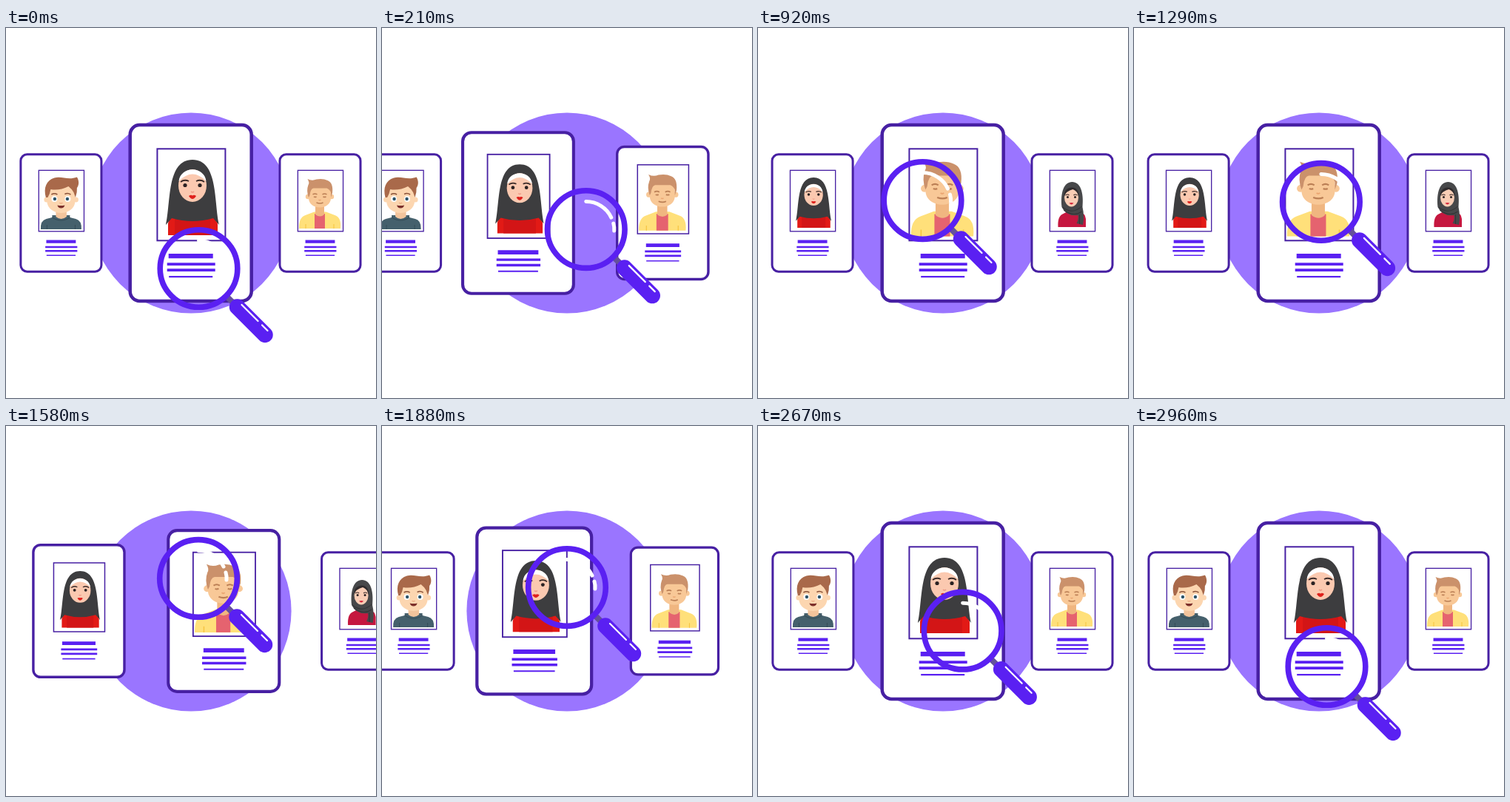
Animation, 500 px wide and 500 px high, one loop 3 s. Source, as an HTML page:

```html
<!DOCTYPE html>
<html>
<head>
<meta charset="utf-8">
<style>
html, body { margin: 0; height: 100%; overflow: hidden; background: #fff; }
svg { display: block; width: 100vw; height: 100vh; }
</style>
</head>
<body>
<svg viewBox="0 0 500 500">
  <defs>
    <g id="sheet">
      <rect x="-82" y="-119" width="164" height="238" rx="13" fill="#fff" stroke="#4720a3" stroke-width="4.500"/>
      <rect x="-45.300" y="-86.700" width="92" height="124" fill="#fff" stroke="#4720a3" stroke-width="2"/>
      <path fill="#5a20f2" d="M-30 55h60v6.300h-60zM-32 67.200h65v3.800h-65zM-32 75.200h65v3.800h-65zM-29.500 85h59v2.200h-59z"/>
    </g>
  </defs>

  <circle cx="250" cy="250" r="135.600" fill="#9a75ff"/>

  <g id="boy"><use href="#sheet"/>
    <g transform="scale(1.504)">
      <path fill="#45606c" d="M-27.500 22Q-28 10 -20 8L-12 6V3H12V6L20 8Q28 10 27.500 22Z"/>
      <path fill="#f3c49c" d="M-7-6H7.500V5Q0 11-7 5Z"/>
      <path fill="none" stroke="#354d58" stroke-width="1" d="M-12 6Q0 14 12 6M-19 16V22M19 16V22"/>
      <g fill="#fcd6b0">
        <circle cx="-19.500" cy="-18" r="3.500"/><circle cx="20" cy="-18" r="3.500"/>
        <path d="M-19-36H19V-16C19-6 9 0 0 0S-19-6-19-16Z"/>
      </g>
      <path fill="#a9694a" d="M-20.500-21C-24-34-20-44-9-47.500C1-50 10-44 21.500-48.500C25-43 24-37 21.500-34Q22-28 19.500-21L17-28Q14-33 10-36Q-2-30-14-32Q-15-26-18-21Z"/>
      <g fill="#fff"><circle cx="-9" cy="-19" r="4"/><circle cx="9" cy="-19" r="4"/></g>
      <g fill="#2d5368"><circle cx="-8.500" cy="-19" r="2.200"/><circle cx="8.500" cy="-19" r="2.200"/></g>
      <path fill="none" stroke="#8a5238" stroke-width="1.500" d="M-13-25Q-9-27.500-5-25M5-25.500Q9-27.500 13-25"/>
      <path fill="none" stroke="#eeb48c" stroke-width="1.500" d="M-2-14Q0-12 2-14"/>
      <path fill="#7c2f2a" d="M-5-10.500Q0-9.500 5-10.500Q4-6.500 0-6.500T-5-10.500Z"/>
    </g>
  </g>

  <g id="red"><use href="#sheet"/>
    <g transform="translate(-249.700 -250)">
      <path fill="#e21a16" d="M219 280V264Q220 255 230 253H274Q285 255 286 265V280Z"/>
      <path fill="#d31516" d="M228 255H276V280H228Z"/>
      <path fill="#3d3d3f" d="M216 266C223 236 217 178 252 178S281 236 288 266L280 257Q252 265 224 257Z"/>
      <ellipse cx="252" cy="213" rx="19" ry="22" fill="#fbc9b0"/>
      <path fill="#fff" d="M233.500 207C236 186 268 186 270.500 207Q252 188 233.500 207Z"/>
      <path fill="none" stroke="#3a2a28" stroke-width="1.800" d="M236 208Q241 204 247 207M257 207Q263 204 268 208"/>
      <g fill="#2b2223"><circle cx="242" cy="212.500" r="2.600"/><circle cx="262" cy="212.500" r="2.600"/></g>
      <path fill="none" stroke="#ee9a86" stroke-width="1.500" d="M250 221Q252 223 254 221"/>
      <path fill="#df211c" d="M247 227Q250 225 252 226.500Q254 225 257 227Q252 235 247 227Z"/>
    </g>
  </g>

  <g id="blond"><use href="#sheet"/>
    <g transform="scale(1.504)">
      <path fill="#ffe07a" d="M-28.500 21Q-29 6 -20 3L-8-1.500H8L20 3Q29 6 27.500 21Z"/>
      <path fill="#e5636f" d="M-7.500 1H6.500V21H-7.500Z"/>
      <path fill="#f5c33f" d="M-20 15h1v6h-1zM18 15h1v6h-1z"/>
      <path fill="#f0b680" d="M-6.500-12H5.500V2Q0 7-6.500 2Z"/>
      <g fill="#f8c897">
        <circle cx="-16.500" cy="-22" r="3.200"/><circle cx="15.500" cy="-22" r="3.200"/>
        <path d="M-15.500-36H14.500V-20C14.500-12 7-7.500-.5-7.500S-15.500-12-15.500-20Z"/>
      </g>
      <path fill="#cb916b" d="M-17-46Q-11-43-5-45.500Q4-47 10-44Q18-41 16.500-27L14.500-21V-28Q13-32 9-33.500H-9Q-13-33-14-24L-15.500-21Q-19-30-16-38Q-14-41-17-46Z"/>
      <path fill="none" stroke="#bb7f55" stroke-width="1.500" d="M-10-25Q-7-27-4-25M3-25Q6-27 9-25M-8.500-22Q-7-21-5-22M4-22Q6-21 8-22M-5-14Q0-12 4-14"/>
      <path fill="none" stroke="#eaa672" stroke-width="1.300" d="M-2-18Q-.5-16.500 1-18"/>
    </g>
  </g>

  <g id="dark"><use href="#sheet"/>
    <g transform="scale(1.504)">
      <path fill="#c5173f" d="M-19 19Q-20 4-12 1L-6-2H8Q18 0 18.500 8V19Z"/>
      <path fill="#47484a" d="M-14-8C-16-28-11-42 0-42S16-28 14-8Q17 5 14.500 16L6 14Q9 9 8 3Q-8 5-14-8Z"/>
      <ellipse cx="-1" cy="-21" rx="9.500" ry="12.500" fill="#f9cdb5"/>
      <path fill="#2f2b2d" d="M-11-22Q-11-34 0-34.500Q9-34 9-22Q7-30 1-32Q-8-30-11-22Z"/>
      <path fill="none" stroke="#333537" stroke-width="1" d="M-13-8Q0 3 13-9M-11-4Q2 6 13-2M10 2V15"/>
      <path fill="none" stroke="#3a2a28" stroke-width="1.100" d="M-9-24Q-6-26-4-24M2-24Q4-26 7-24"/>
      <g fill="#2b2223"><circle cx="-6" cy="-21.500" r="1.500"/><circle cx="4" cy="-21.500" r="1.500"/></g>
      <path fill="#d6263a" d="M-4-13.500Q-1-14.500 2-13.500Q-1-9.500-4-13.500Z"/>
    </g>
  </g>

  <g id="lens" fill="none" stroke-linecap="round">
    <path stroke="#fff" stroke-width="5" d="M0-37.500A37.500 37.500 0 0 1 34-16M37-8Q38.500-3 38 2"/>
    <path stroke="#65509c" stroke-width="8" stroke-linecap="butt" d="M37 37L50 50"/>
    <circle r="52.300" stroke="#5a20f2" stroke-width="7.600"/>
    <path stroke="#5a20f2" stroke-width="21.500" d="M52 52L89.500 89.500"/>
    <path stroke="#fff" stroke-width="2.200" d="M58 49L80 71M85.500 76.500L93 84"/>
  </g>
</svg>
<script>
const LOOP = 3000, SMALL = 0.665, MID = 250;
const LEFT = 74.4, CENTER = 249.7, RIGHT = 424.5;

// Lens centre: time, x, y
const path = [
  [0, 260.5, 325], [460, 278.5, 197], [580, 256, 196.5], [920, 222.5, 233],
  [1080, 229, 243], [1330, 256, 232], [1580, 260, 206], [1880, 250, 218],
  [2210, 229.5, 245.5], [2380, 235.5, 266], [2720, 279, 281.5], [2960, 260.5, 325]
];

const el = id => document.getElementById(id);
const mix = (a, b, k) => a + (b - a) * k;
const smooth = u => u * u * (3 - 2 * u);
const ease = (t, from, to) => smooth(Math.min(1, Math.max(0, (t - from) / (to - from))));

// Slope of one coordinate at key i, zero at both ends
function slope(i, c) {
  const a = path[i - 1], b = path[i], d = path[i + 1];
  if (!a || !d) return 0;
  const h = b[0] - a[0], k = d[0] - b[0];
  return ((b[c] - a[c]) / h * k + (d[c] - b[c]) / k * h) / (h + k);
}

function along(t, c) {
  const last = path.length - 1;
  if (t >= path[last][0]) return path[last][c];
  const i = path.findIndex(k => k[0] > t) - 1;
  const a = path[i], b = path[i + 1], h = b[0] - a[0], u = (t - a[0]) / h;
  return mix(a[c], b[c], smooth(u))
    + h * u * (1 - u) * ((1 - u) * slope(i, c) - u * slope(i + 1, c));
}

function place(id, x, y, scale = 1) {
  el(id).setAttribute("transform", `translate(${x} ${y}) scale(${scale})`);
}

function draw(now) {
  const t = now % LOOP;
  // p = 1: red in the middle, p = 0: blond in the middle
  const p = 1 - ease(t, 40, 554) + ease(t, 1340, 2070);
  place("boy", LEFT - 191 * (1 - p), MID, SMALL);
  place("red", mix(LEFT - 0.8, CENTER, p * (0.4 + 0.6 * p)), MID, mix(SMALL, 1, p));
  place("blond", mix(CENTER, RIGHT, p), MID, mix(1, SMALL, p));
  place("dark", RIGHT + 222 * p, MID, SMALL);
  place("lens", along(t, 1), along(t, 2));
  requestAnimationFrame(draw);
}

draw(0);
</script>
</body>
</html>
```
